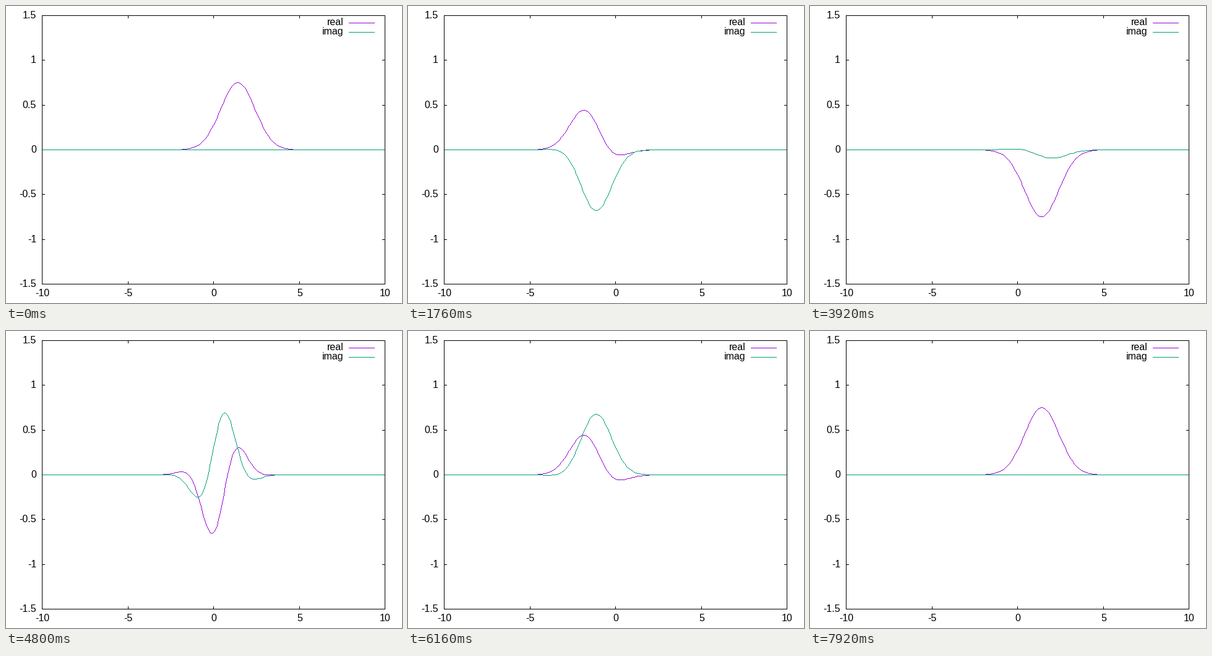
These frames come from a looping animation (640 by 480 pixels, 8000 ms). A matplotlib script:

```python
import numpy as np
import matplotlib.pyplot as plt
from matplotlib.animation import FuncAnimation

WIDTH, HEIGHT = 640, 480
LEFT, RIGHT, TOP, BOTTOM = 58, 612, 15, 449
FRAMES, INTERVAL = 100, 80
PURPLE, GREEN = "#9400d3", "#009e73"
FONT_PX = 16
TICK = 4

# Advance widths in em, used to anchor text by its pen position.
ADVANCE = {"-": 0.333, ".": 0.278, "r": 0.333, "l": 0.222, "i": 0.222, "m": 0.833}

plt.rcParams["font.family"] = "Liberation Sans"
fig = plt.figure(figsize=(WIDTH / 100, HEIGHT / 100), dpi=100, facecolor="white")
ax = fig.add_axes([0, 0, 1, 1])
ax.set_xlim(0, WIDTH)
ax.set_ylim(HEIGHT, 0)
ax.axis("off")


def to_px(x):
    return LEFT + (x + 10) / 20 * (RIGHT - LEFT)


def to_py(y):
    return BOTTOM - (y + 1.5) / 3 * (BOTTOM - TOP)


def snap(v):
    return np.floor(np.asarray(v, float) + 0.5).astype(int)


def trace(xs, ys):
    """Pixels of a hard-edged, one pixel wide polyline."""
    xs, ys = snap(xs), snap(ys)
    cols, rows = [], []
    for x0, y0, x1, y1 in zip(xs[:-1], ys[:-1], xs[1:], ys[1:]):
        n = max(abs(x1 - x0), abs(y1 - y0), 1)
        step = np.arange(n + 1) / n
        cols.append(x0 + (x1 - x0) * step)
        rows.append(y0 + (y1 - y0) * step)
    # The pixel marker sits just above its anchor, hence the extra row.
    return snap(np.concatenate(cols)), snap(np.concatenate(rows)) + 1


def pixels(xs, ys, color, z):
    return ax.plot(*trace(xs, ys), ",", color=color, zorder=z)[0]


def label(text, x, baseline, align):
    width = FONT_PX * sum(ADVANCE.get(c, 0.556) for c in text)
    ax.text(x - width * align, baseline, text, fontsize=FONT_PX * 0.72,
            color="black", ha="left", va="baseline")


def draw_frame():
    pixels([LEFT, RIGHT, RIGHT, LEFT, LEFT],
           [TOP, TOP, BOTTOM, BOTTOM, TOP], "black", 5)
    for value in range(-10, 11, 5):
        x = to_px(value)
        pixels([x, x], [BOTTOM, BOTTOM - TICK], "black", 1)
        pixels([x, x], [TOP, TOP + TICK], "black", 1)
        label(f"{value}", x + 1, 469, 0.5)
    for value in np.arange(-3, 4) / 2:
        y = to_py(value)
        pixels([LEFT, LEFT + TICK], [y, y], "black", 1)
        pixels([RIGHT, RIGHT - TICK], [y, y], "black", 1)
        label(f"{value:g}", 49, snap(y) + 5, 1)


def draw_key():
    for name, y, color in (("real", 27, PURPLE), ("imag", 42, GREEN)):
        label(name, 545.5, y + 4, 1)
        pixels([554, 595], [y, y], color, 2)


def coherent_state(x, t):
    """Oscillator ground state displaced by sqrt(2), at time t."""
    q, p = np.sqrt(2) * np.cos(t), -np.sqrt(2) * np.sin(t)
    phase = p * x - p * q / 2 - t / 2
    return np.pi ** -0.25 * np.exp(-(x - q) ** 2 / 2 + 1j * phase)


grid = np.linspace(-10, 10, 201)
draw_frame()
draw_key()
real = ax.plot([], [], ",", color=PURPLE, zorder=3)[0]
imag = ax.plot([], [], ",", color=GREEN, zorder=4)[0]


def update(i):
    psi = coherent_state(grid, 4 * np.pi * i / (FRAMES - 1))
    real.set_data(*trace(to_px(grid), to_py(psi.real)))
    imag.set_data(*trace(to_px(grid), to_py(psi.imag)))
    return real, imag


anim = FuncAnimation(fig, update, frames=FRAMES, interval=INTERVAL,
                     repeat=True, repeat_delay=0, blit=False)
plt.show()
```
